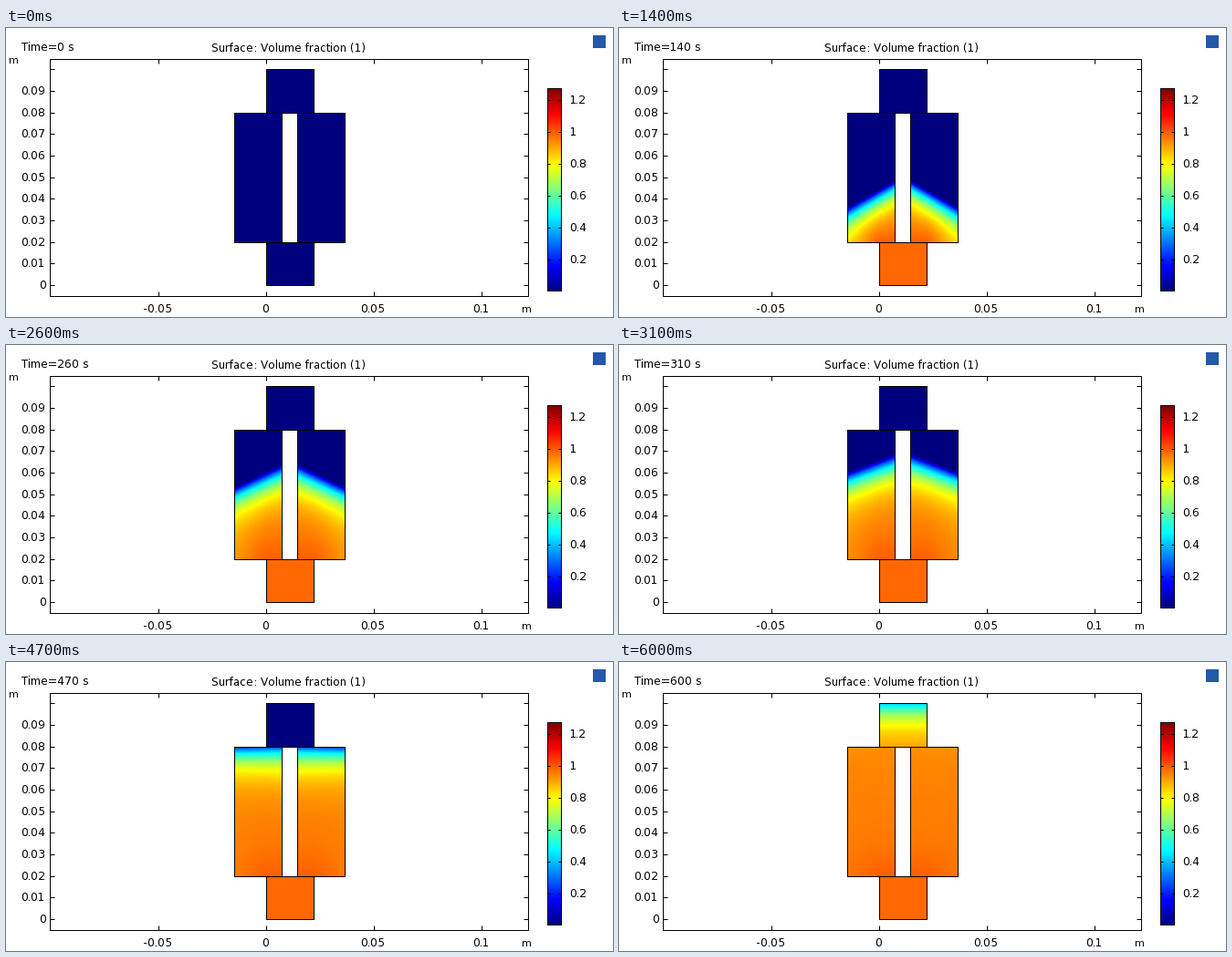
Write a matplotlib script that moves like this. It is 665x317 px and loops after 6100 ms.

```python
import numpy as np
import matplotlib.pyplot as plt
from matplotlib.animation import FuncAnimation
from matplotlib.colors import LinearSegmentedColormap
from matplotlib.patches import Rectangle

W, H, DPI = 665, 317, 100
FRAMES, STEP_MS, STEP_S = 61, 100, 10
PX = 72 / DPI
CMAX = 1.274
FLOOR, BASE, DECK, ROOF = 282, 235, 93, 45  # horizontal edges of the domain
INLET = 285  # outer edge of the inlet

RAINBOW = LinearSegmentedColormap.from_list("rainbow", [
    (0, (0, 0, 0.5)), (0.125, (0, 0, 1)), (0.375, (0, 1, 1)),
    (0.625, (1, 1, 0)), (0.875, (1, 0, 0)), (1, (0.5, 0, 0))], N=512)

# Height of the leading edge above the column base, in pixels
RISE_T = [20, 48, 70, 200, 310, 390, 470, 600]
RISE_INNER = [0, 28, 42, 91, 116, 131, 148, 218]
RISE_OUTER = [-16, 0, 14, 60, 96, 120, 146, 211]

plt.rcParams["font.family"] = "DejaVu Sans"
plt.rcParams["text.hinting_factor"] = 1  # whole-pixel glyph advances
fig = plt.figure(figsize=(W / DPI, H / DPI), dpi=DPI, facecolor="white")
ax = fig.add_axes([0, 0, 1, 1])
ax.axis("off")


def line(x0, y0, x1, y1):
    ax.plot([x0, x1], [y0, y1], color="black", lw=PX,
            solid_capstyle="butt", zorder=3)


def frame(x0, y0, x1, y1):
    ax.add_patch(Rectangle((x0, y0), x1 - x0, y1 - y0, fill=False,
                           ec="black", lw=PX, joinstyle="miter", zorder=4))


def label(x, y, text, ha="left", size=12):
    return ax.text(x, y, text, ha=ha, va="baseline", fontsize=size * PX)


def block(x0, y0, x1, y1):
    """Outlined colour-mapped area that reaches under its outline."""
    frame(x0, y0, x1, y1)
    return ax.imshow(np.zeros((y1 - y0 + 1, x1 - x0 + 1)), cmap=RAINBOW,
                     vmin=0, vmax=CMAX, extent=(x0, x1 + 1, y1 + 1, y0),
                     aspect="auto", interpolation="nearest", zorder=2)


def fill(depth, length):
    """Concentration at a depth behind the leading edge."""
    return 1 - np.exp(-np.maximum(depth, 0) / length)


def inlet_field(t):
    s = FLOOR - np.arange(BASE, FLOOR + 1)[:, None]
    c = 0.985 * fill(2.4 * t - s, 10 + min(t, 40) / 10)
    return np.repeat(c, 53, axis=1)


def column_field(t, source):
    y, x = np.mgrid[DECK:BASE + 1, 250:303]
    k = (x - 250) / 52
    inner = np.interp(t, RISE_T, RISE_INNER)
    outer = np.interp(t, RISE_T, RISE_OUTER)
    if t < RISE_T[0]:
        inner = outer = -1
    depth = outer + (inner - outer) * k - (BASE - y)
    length = 16 + k * np.interp(t, [70, 200], [-4, 2])
    side = np.maximum(INLET - x, 0)
    d = np.hypot(side, BASE - y)
    loss = 0.06 * d / (d + 40) + 0.09 * side / 35 * np.exp(-(t / 300) ** 2)
    c = fill(depth, length) * (0.995 - loss)
    glow = np.maximum(source + 0.01 - c, 0) * np.exp(-d / 11)
    return c + glow * (depth > 0)


def outlet_field(t):
    y = np.arange(ROOF, DECK + 1)[:, None]
    edge = DECK - 0.47 * (t - 475)
    return np.repeat(0.945 * fill(y - edge, 19), 53, axis=1)


# Plot frame and axes
frame(48, 34, 572, 294)
for x, text in zip((167, 285, 403, 521), ("-0.05", "0", "0.05", "0.1")):
    line(x, 34, x, 39)
    line(x, 289, x, 294)
    label(x - 1, 312, text, "center")
for i in range(11):
    y = round(FLOOR - 23.67 * i)
    line(48, y, 53, y)
    line(567, y, 572, y)
    if i < 10:
        label(16 if i else 36, y + 4, f"{i / 100:g}")
label(2, 39, "m", size=11)
label(564, 312, "m", size=11)
label(225, 26, "Surface: Volume fraction (1)")
clock = label(17, 25, "")

# Colour bar
ax.imshow(np.linspace(CMAX, 0, 223)[:, None], cmap=RAINBOW, vmin=0, vmax=CMAX,
          extent=(593, 609, 289, 66), aspect="auto",
          interpolation="nearest", zorder=2)
frame(593, 66, 608, 288)
for i in range(1, 7):
    y = 289 - 35 * i
    line(593, y, 596, y)
    line(605, y, 608, y)
    label(617, y + 4, f"{i / 5:g}")

ax.add_patch(Rectangle((643, 8), 14, 14, fc="#2458a8", ec="none"))

# Flow domain
inlet = block(INLET, BASE, 337, FLOOR)
outlet = block(INLET, ROOF, 337, DECK)
left = block(250, DECK, 302, BASE)
right = block(319, DECK, 371, BASE)

ax.set_xlim(0, W)
ax.set_ylim(H, 0)


def update(i):
    t = i * STEP_S
    clock.set_text(f"Time={t} s")
    pool = inlet_field(t)
    column = column_field(t, pool[0, 0])
    inlet.set_data(pool)
    left.set_data(column)
    right.set_data(column[:, ::-1])
    outlet.set_data(outlet_field(t))
    return clock, inlet, left, right, outlet


anim = FuncAnimation(fig, update, frames=FRAMES, interval=STEP_MS,
                     repeat=True, repeat_delay=0, blit=False)
plt.show()
```
